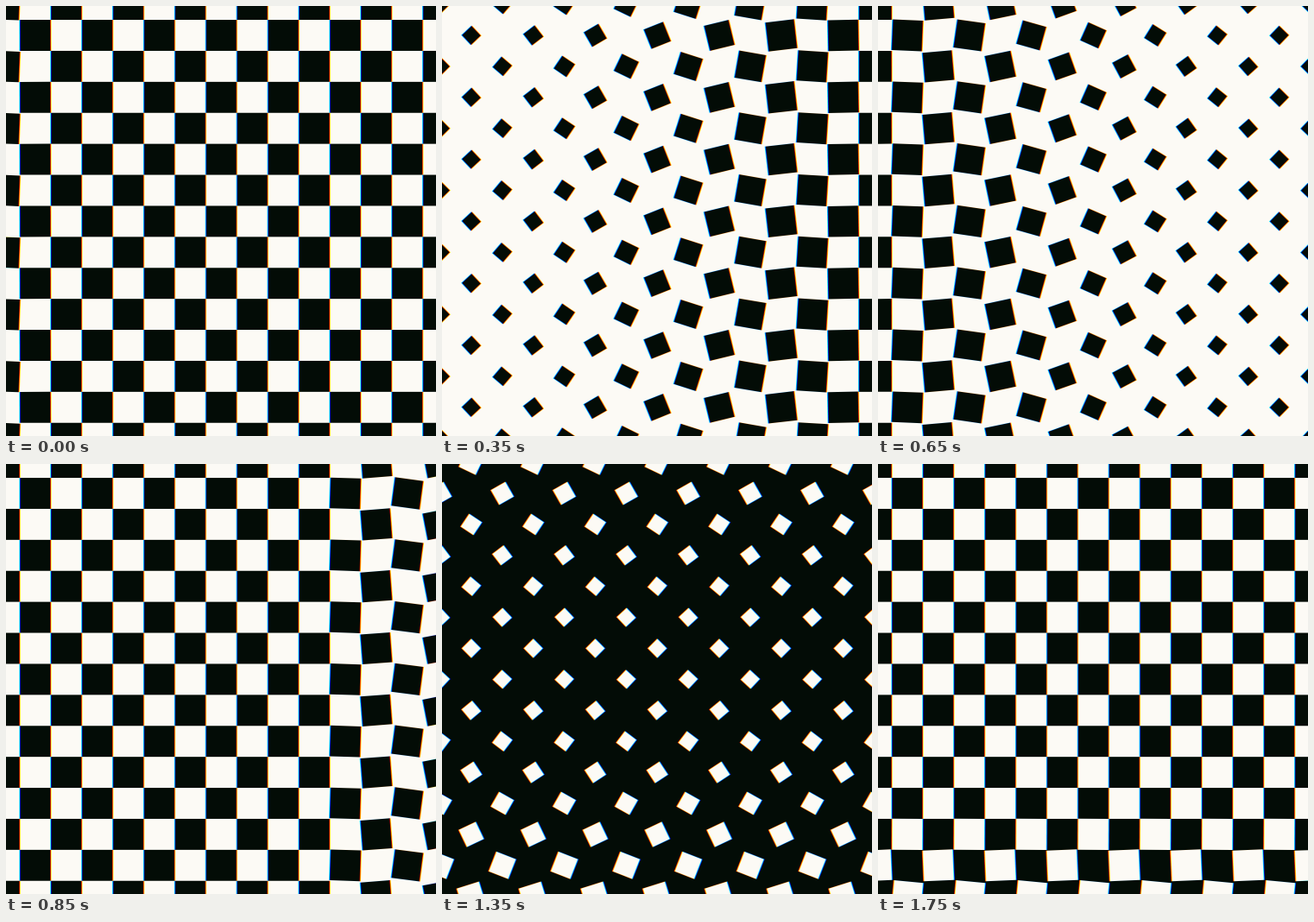
An HTML page with a canvas that plays this animation: 498 px wide and 498 px high, repeating every 1.8 s.

```html
<!DOCTYPE html>
<html lang="en">
<head>
<meta charset="utf-8">
<title>Checkerboard turn</title>
<style>
  html, body { margin: 0; width: 100%; height: 100%; overflow: hidden; background: #fcfaf5; }
  canvas { display: block; }
</style>
</head>
<body>
<canvas id="board" width="498" height="498"></canvas>
<script>
const ctx = document.getElementById('board').getContext('2d');
const SIZE = 498, MID = 249.4, CELL = 35.9, REACH = 8;
const LOOP = 1800, HALF = 900, STEP = 50;
const LIGHT = [252, 250, 245], DARK = [3, 12, 6];
const FRINGE = 0.7;   // sideways offset between colour channels
const SPAN = 13.5;    // cells from the wave's middle to its edge
const SHRINK = 0.56;

const rgb = c => `rgb(${c.join(',')})`;

// Position of the wave's middle, in cells from the centre.
const wave = t => -19.4 + 0.031 * t + 0.0000134 * t * t;

// Turn in degrees, 0 to 90, for a tile d cells behind the wave's middle.
function turn(d) {
  const q = Math.max(0, 1 - Math.abs(d) / SPAN);
  const smooth = q * q * (3 - 2 * q);
  const half = 45 * (q + smooth) / 2;
  return d < 0 ? half : 90 - half;
}

function tile(col, row, d, shift) {
  const angle = turn(d) * Math.PI / 180;
  const bend = Math.max(0, Math.sin(2 * angle));
  const side = CELL * (1 - SHRINK * bend ** 1.5);
  ctx.save();
  ctx.translate(MID + col * CELL + shift, MID + row * CELL);
  ctx.rotate(col % 2 ? angle : -angle);
  ctx.fillRect(-side / 2, -side / 2, side, side);
  ctx.restore();
}

function draw(time) {
  const t = Math.floor(time % LOOP / STEP) * STEP;
  const across = t < HALF;
  const front = across ? wave(t) : wave(t - HALF) + 1.7;

  ctx.globalCompositeOperation = 'source-over';
  ctx.fillStyle = rgb(across ? LIGHT : DARK);
  ctx.fillRect(0, 0, SIZE, SIZE);

  // Dark tiles remove one channel at a time, light tiles add one.
  ctx.globalCompositeOperation = across ? 'multiply' : 'lighter';
  for (let ch = 0; ch < 3; ch++) {
    const ink = across ? [255, 255, 255] : [0, 0, 0];
    ink[ch] = across ? DARK[ch] : LIGHT[ch] - DARK[ch];
    ctx.fillStyle = rgb(ink);
    for (let row = -REACH; row <= REACH; row++) {
      for (let col = -REACH; col <= REACH; col++) {
        const even = (row + col) % 2 === 0;
        if (even === across) tile(col, row, front - (across ? col : row), (ch - 1) * FRINGE);
      }
    }
  }
}

const start = performance.now();
function frame() {
  draw(performance.now() - start);
  requestAnimationFrame(frame);
}
frame();
</script>
</body>
</html>
```
